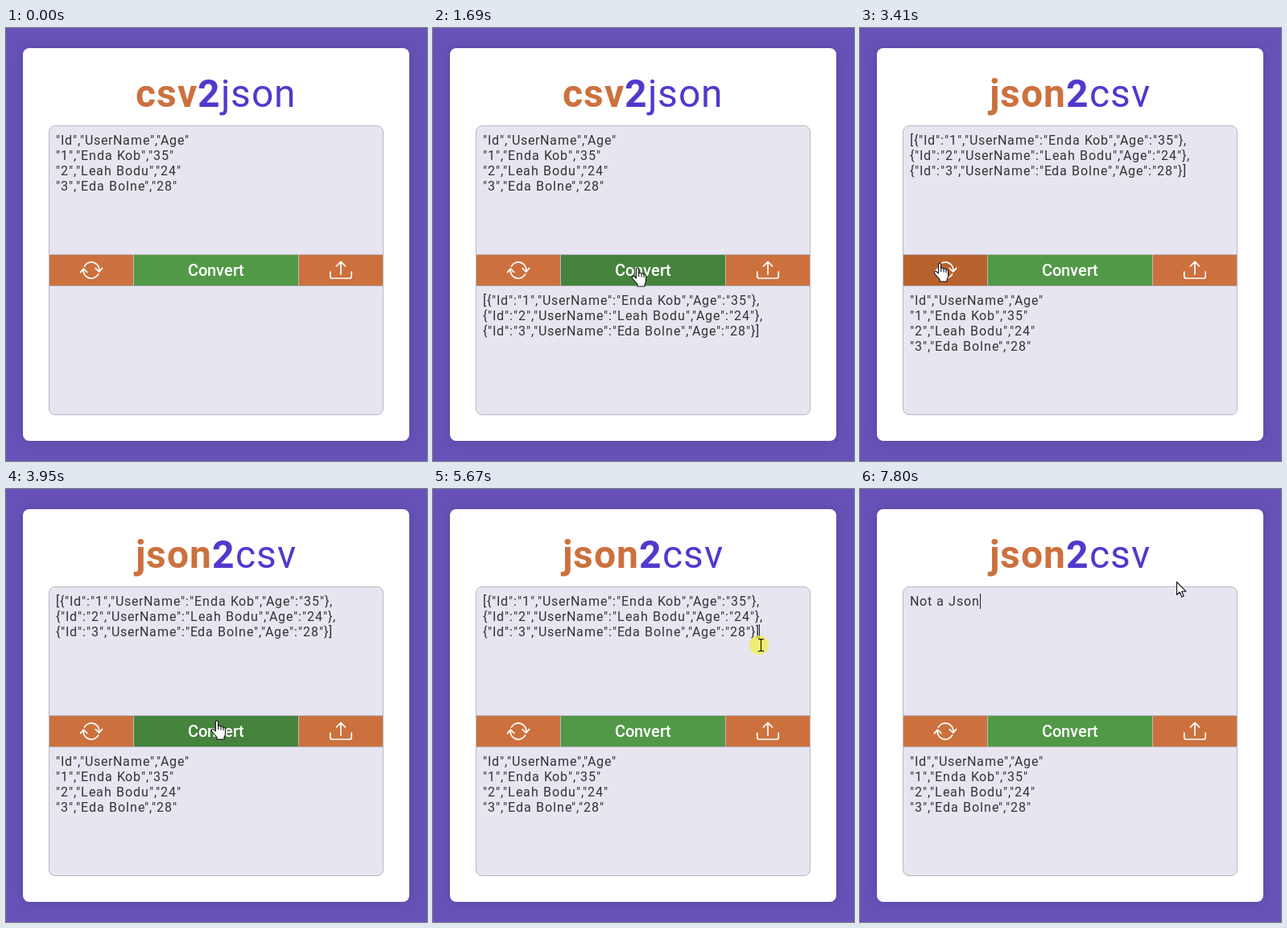
Animation of 523 by 538 pixels, one loop 8 s. Source, as an HTML page with a canvas:

```html
<!DOCTYPE html>
<html lang="en">
<head>
<meta charset="utf-8">
<title>csv2json</title>
<style>
html, body { margin: 0; width: 100%; height: 100%; overflow: hidden; background: #6852b9; }
canvas { display: block; }
</style>
</head>
<body>
<canvas id="stage" width="523" height="538"></canvas>
<script>
const ctx = document.getElementById('stage').getContext('2d');
const LOOP = 8000;
const COLOR = {
  page: '#6852b9', box: '#e7e5f0', line: '#b9b8c2', text: '#333',
  orange: '#cc713e', orangeHover: '#b8622e', green: '#529947', greenHover: '#46833d',
  purple: '#5139cc', select: '#2a8bfb', click: 'rgba(244, 240, 60, .7)'
};
const BODY = '16px Roboto, sans-serif';
const LEFT = 62, TOP = 130, LINE = 19, LOWER = 199;

const people = [['Enda Kob', 35], ['Leah Bodu', 24], ['Eda Bolne', 28]];
const csv = ['"Id","UserName","Age"', ...people.map(([name, age], i) => `"${i + 1}","${name}","${age}"`)];
const json = people.map(([name, age], i) =>
  `${i ? '' : '['}{"Id":"${i + 1}","UserName":"${name}","Age":"${age}"}${i < 2 ? ',' : ']'}`);

const CONVERTED = 1690, SWAPPED = 3410, CARET = 5670, DRAG = 5740, SELECTED = 5900;
const typed = 'Not a Json';
const keyTimes = [6770, 6940, 7010, 7090, 7160, 7330, 7480, 7650, 7730, 7800];
const clicks = [[1540, 1690], [3160, 3410], [4340, 4410], [5670, 5980]];

// Pointer stops: time, x, y, and the number of jumps taken to get there.
const stops = [
  [690, 427, 470, 1], [1150, 266, 317, 6], [1340, 254, 298, 2],
  [2400, 232, 298, 1], [2630, 124.5, 293, 3], [2780, 99, 292, 2],
  [3710, 120, 291, 1], [3950, 262, 288, 3], [4100, 264, 292, 1], [4170, 265, 295, 1],
  [5040, 285, 284, 1], [5270, 434, 151, 3], [5500, 407, 194, 3],
  [DRAG, 402, 203, 1], [SELECTED, 8, 140, 2], [6220, 393, 115, 4]
];

const buttons = [
  { x: 54, w: 104, fill: COLOR.orange, hover: COLOR.orangeHover },
  { x: 159, w: 204, fill: COLOR.green, hover: COLOR.greenHover },
  { x: 364, w: 104, fill: COLOR.orange, hover: COLOR.orangeHover }
];

const syncIcon = new Path2D('M-8.6 -5A9.9 9.9 0 0 1 9.7 2M5.2 -2.4L9.7 2L13.6 -2.6' +
  'M8.6 5A9.9 9.9 0 0 1 -9.7 -2M-5.2 2.4L-9.7 -2L-13.6 2.6');
const uploadIcon = new Path2D('M-13.2 2V7.5Q-13.2 10 -10.7 10H10.7Q13.2 10 13.2 7.5V2M0 5V-10.5M-5.5 -5.2L0 -10.7L5.5 -5.2');
const arrow = new Path2D('M.5 .5V16.5L4.2 13L6.8 19L9.2 18L6.7 12.2H11.8Z');
const hand = new Path2D('M-1.6 13V1.7Q-1.6 0 0 0T1.6 1.7V6.5Q4.5 5 5 7.5Q7.5 6 8 8.5Q10.5 7.5 10.5 10V16' +
  'Q10.5 18 9 20.5V23H0V20.5L-6 13.5Q-7.5 11.5 -6 10.5T-1.6 13Z');
const knuckles = new Path2D('M1.7 6.5V11M5 7.5V11.5M8 8.5V12');
const beam = new Path2D('M-3.5 -7.5H-1L0 -6.5L1 -7.5H3.5M0 -6.5V6.5M-3.5 7.5H-1L0 6.5L1 7.5H3.5');

function pointerAt(t) {
  if (t < stops[0][0]) return null;
  const next = stops.findIndex(s => s[0] > t);
  if (next < 0) {
    const [, x, y] = stops[stops.length - 1];
    return { x, y };
  }
  const [t0, x0, y0] = stops[next - 1];
  const [t1, x1, y1, jumps] = stops[next];
  const u = Math.floor((t - t0) / (t1 - t0) * jumps + 1e-6) / jumps;
  return { x: x0 + (x1 - x0) * u, y: y0 + (y1 - y0) * u };
}

const inside = (p, x, y, w, h) => p && p.x >= x && p.x < x + w && p.y >= y && p.y < y + h;

// Places glyphs on whole pixels: rounded advances plus kerning and spacing.
function layout(text, font, spacing) {
  ctx.font = font;
  const width = s => ctx.measureText(s).width;
  let x = 0;
  const glyphs = [...text].map((char, i) => {
    const glyph = { char, x };
    const next = text[i + 1];
    const kern = next ? width(char + next) - width(char) - width(next) : 0;
    x += Math.round(width(char)) + kern + spacing;
    return glyph;
  });
  return { glyphs, width: x };
}

const cache = new Map();
function measure(text, font = BODY, spacing = 1) {
  const key = font + spacing + text;
  if (!cache.has(key)) cache.set(key, layout(text, font, spacing));
  return cache.get(key);
}

function drawText(text, x, y, color, font = BODY, spacing = 1) {
  const { glyphs } = measure(text, font, spacing);
  ctx.font = font;
  ctx.fillStyle = color;
  for (const g of glyphs) ctx.fillText(g.char, Math.round(x + g.x), y);
}

function drawLines(lines, offset, color) {
  lines.forEach((line, i) => drawText(line, LEFT, TOP + offset + 15 + i * LINE, color));
}

function drawCaret(text, row) {
  ctx.fillStyle = '#222';
  ctx.fillRect(Math.floor(LEFT + measure(text).width), TOP + row * LINE, 1, LINE);
}

function drawTitle(swapped) {
  const [from, to] = swapped ? ['json', 'csv'] : ['csv', 'json'];
  const bold = 'bold 48px Roboto, sans-serif', plain = '48px Roboto, sans-serif';
  const parts = [[from, bold, COLOR.orange], ['2', bold, COLOR.purple], [to, plain, COLOR.purple]];
  const widths = parts.map(([text, font]) => measure(text, font).width);
  let x = 261 - widths.reduce((a, b) => a + b) / 2;
  parts.forEach(([text, font, color], i) => {
    drawText(text, x, 98, color, font);
    x += widths[i];
  });
}

function drawCard() {
  ctx.fillStyle = COLOR.page;
  ctx.fillRect(0, 0, 523, 538);
  ctx.save();
  ctx.shadowColor = 'rgba(0, 0, 0, .15)';
  ctx.shadowBlur = 16;
  ctx.fillStyle = '#fff';
  ctx.beginPath();
  ctx.roundRect(21, 25, 480, 488, 8);
  ctx.fill();
  ctx.restore();
  ctx.beginPath();
  ctx.roundRect(53.5, 121.5, 415, 359, 7.5);
  ctx.fillStyle = COLOR.box;
  ctx.fill();
  ctx.strokeStyle = COLOR.line;
  ctx.lineWidth = 1;
  ctx.stroke();
}

function drawIcon(path, x, y) {
  ctx.save();
  ctx.translate(x, y);
  ctx.lineWidth = 1.7;
  ctx.lineCap = ctx.lineJoin = 'round';
  ctx.strokeStyle = '#fff';
  ctx.stroke(path);
  ctx.restore();
}

function drawButtons(p) {
  ctx.fillStyle = COLOR.line;
  ctx.fillRect(53, 281, 416, 40);
  for (const b of buttons) {
    ctx.fillStyle = inside(p, b.x, 282, b.w, 38) ? b.hover : b.fill;
    ctx.fillRect(b.x, 282, b.w, 38);
  }
  drawIcon(syncIcon, 106, 301);
  drawIcon(uploadIcon, 416, 301);
  const font = '500 20px Roboto, sans-serif';
  drawText('Convert', 261 - measure('Convert', font, 0).width / 2, 308, '#fff', font, 0);
}

function drawSelection(p, done) {
  const row = done ? 0 : Math.max(0, Math.min(2, Math.floor((p.y - TOP) / LINE)));
  const from = done ? LEFT : Math.max(LEFT, p.x);
  ctx.save();
  ctx.beginPath();
  json.forEach((line, i) => {
    if (i < row) return;
    const start = i === row ? from : LEFT;
    const end = Math.round(LEFT + measure(line).width + (i < 2 ? 5 : 0));
    if (end > start) ctx.rect(start, TOP + i * LINE, end - start, LINE);
  });
  ctx.fillStyle = COLOR.select;
  ctx.fill();
  ctx.clip();
  drawLines(json, 0, '#fff');
  ctx.restore();
}

function drawInput(t, p) {
  const count = keyTimes.filter(k => k <= t).length;
  if (count) {
    const text = typed.slice(0, count);
    drawLines([text], 0, COLOR.text);
    drawCaret(text, 0);
    return;
  }
  drawLines(t < SWAPPED ? csv : json, 0, COLOR.text);
  if (t >= DRAG) drawSelection(p, t >= SELECTED);
  else if (t >= CARET) drawCaret(json[2], 2);
}

function drawPointer(t, p) {
  if (!p) return;
  if (clicks.some(([a, b]) => t >= a && t < b)) {
    ctx.fillStyle = COLOR.click;
    ctx.beginPath();
    ctx.arc(p.x - 2, p.y, 12, 0, Math.PI * 2);
    ctx.fill();
  }
  const dragging = t >= CARET && t < SELECTED + 80;
  const overButton = inside(p, 54, 282, 414, 38);
  const overText = dragging || inside(p, 54, 122, 414, 358);
  ctx.save();
  ctx.translate(p.x, p.y);
  ctx.lineJoin = 'round';
  ctx.fillStyle = '#fff';
  ctx.strokeStyle = '#111';
  ctx.lineWidth = 1.1;
  if (overButton) {
    ctx.fill(hand);
    ctx.stroke(hand);
    ctx.stroke(knuckles);
  } else if (overText) {
    ctx.translate(.5, 0);
    ctx.stroke(beam);
  } else {
    ctx.fill(arrow);
    ctx.stroke(arrow);
  }
  ctx.restore();
}

function draw(t) {
  const p = pointerAt(t);
  drawCard();
  drawTitle(t >= SWAPPED);
  drawInput(t, p);
  if (t >= CONVERTED) drawLines(t < SWAPPED ? json : csv, LOWER, COLOR.text);
  drawButtons(p);
  drawPointer(t, p);
}

const begin = performance.now();
function tick() {
  draw((performance.now() - begin) % LOOP);
  requestAnimationFrame(tick);
}
tick();
</script>
</body>
</html>
```
